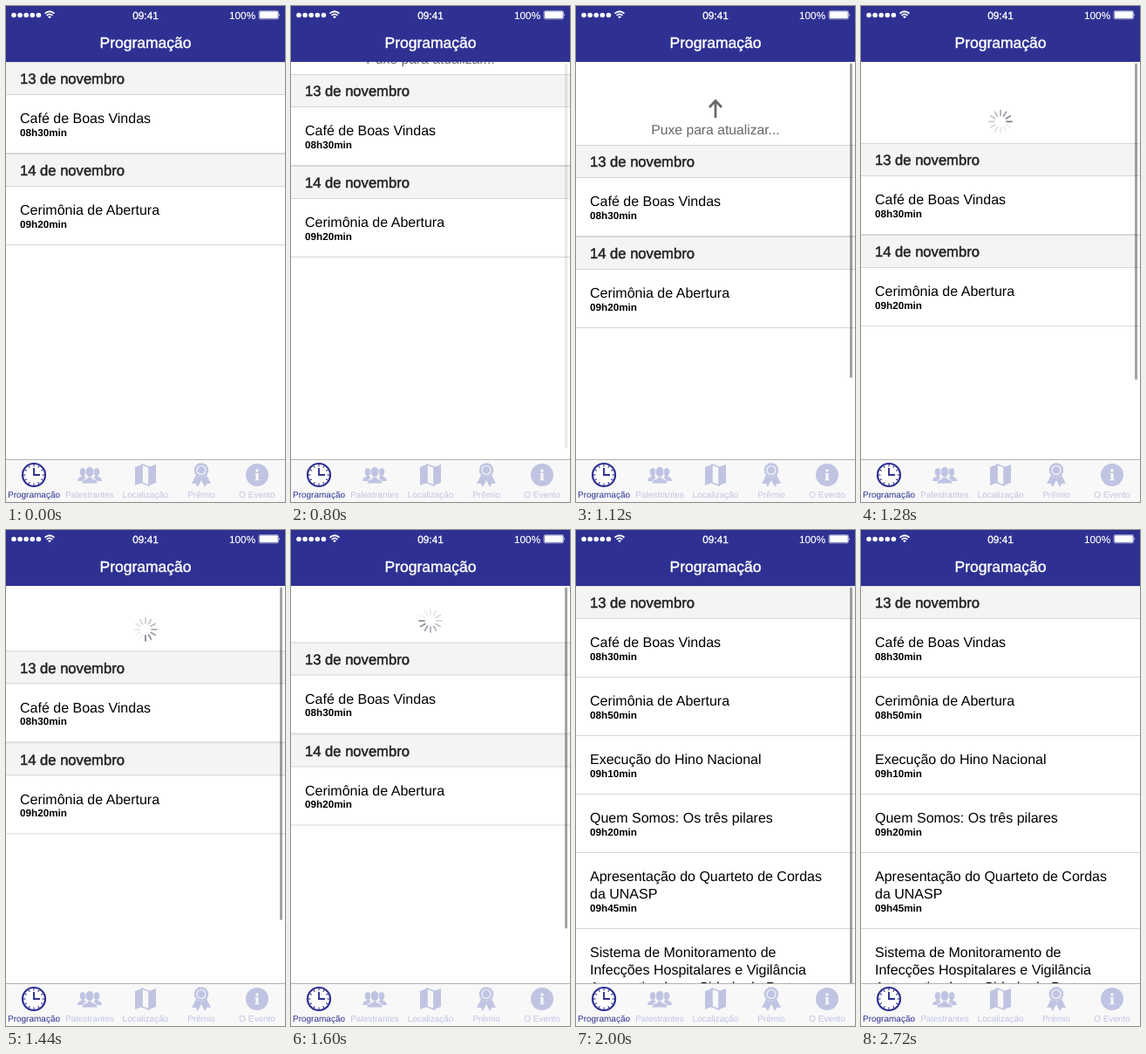
Write an HTML page that moves like this. It is 320x568 px and loops after 2880 ms.

```html
<!DOCTYPE html>
<html lang="pt-BR">
<head>
<meta charset="utf-8">
<title>Programação</title>
<style>
  html, body { margin: 0; width: 100%; height: 100%; overflow: hidden; background: #fff; }
  svg { display: block; width: 100vw; height: 100vh; }
  text { font-family: "Liberation Sans", Arial, sans-serif; text-rendering: geometricPrecision; }
  .day { font-size: 16.6px; fill: #222; stroke: #222; stroke-width: .5; }
  .event { font-size: 16px; fill: #000; }
  .time { font-size: 11.7px; font-weight: bold; fill: #000; }
  .status { font-size: 11.8px; fill: #fff; stroke: #fff; stroke-width: .15; }
  .tab { color: #c0c4e2; }
  .tab.active { color: #2e3192; }
  .tab text { font-size: 10px; fill: currentColor; text-anchor: middle; }
</style>
</head>
<body>
<svg viewBox="0 0 320 568">
  <rect width="320" height="568" fill="#fff"/>

  <g id="content">
    <g id="pull" fill="none" stroke="#666">
      <path id="arrow" d="M0-10V9M-7 2L0 9.500L7 2" stroke-width="2.700"/>
      <text x="160" y="-12" text-anchor="middle" font-size="15.7" fill="#666" stroke="none">Puxe para atualizar...</text>
    </g>
    <g id="spinner" transform="translate(160 -24.500)" stroke="#5f6270" stroke-width="1.700" stroke-linecap="round"></g>
    <g id="shortList"></g>
    <g id="fullList"></g>
  </g>
  <rect id="scrollbar" x="314" y="65.500" width="3" rx="1.500" fill="#000"/>

  <rect width="320" height="64" fill="#2e3192"/>
  <text x="160" y="48" text-anchor="middle" font-size="17.5" fill="#fff" stroke="#fff" stroke-width=".4">Programação</text>
  <g fill="#fff">
    <path d="M9 10.500H38" stroke="#fff" stroke-width="5.600" stroke-linecap="round" stroke-dasharray="0 7.100"/>
    <path d="M44.500 8.700Q50 3.800 55.500 8.700M46.600 10.900Q50 8 53.400 10.900" fill="none" stroke="#fff" stroke-width="1.700"/>
    <path d="M48 12.300Q50 10.800 52 12.300L50 14.300Z"/>
    <rect x="290" y="5.500" width="22.500" height="9.500" rx="1.500" fill="none" stroke="#fff" stroke-width=".5"/>
    <rect x="290.800" y="6.300" width="21" height="8" rx="1"/>
    <path d="M313.300 8.500Q315 10.200 313.300 12Z"/>
  </g>
  <text class="status" x="160" y="14.500" text-anchor="middle" style="stroke-width:.35">09:41</text>
  <text class="status" x="256" y="14.500">100%</text>

  <rect y="519" width="320" height="49" fill="#f8f8f8"/>
  <rect y="519" width="320" height="1" fill="#b2b2b2"/>
  <g class="tab active" transform="translate(32 537)">
    <circle r="13" fill="#fff" stroke="currentColor" stroke-width="2.200"/>
    <g id="ticks" stroke="currentColor" stroke-width="1.100"></g>
    <path d="M0-8V0H7" fill="none" stroke="currentColor" stroke-width="1.900"/>
    <text y="26">Programação</text>
  </g>
  <g class="tab" transform="translate(96 537)" fill="currentColor">
    <g id="sidePerson">
      <ellipse cx="-8" cy="-3.500" rx="3.300" ry="4.300"/>
      <path d="M-14 7Q-14 3-9.500 2V0H-6V2L-4 3Q-7 4-7.500 7Z"/>
    </g>
    <use href="#sidePerson" transform="scale(-1 1)"/>
    <g stroke="#f8f8f8" stroke-width=".8">
      <path d="M-9 10Q-9 5.500-2.500 4V0H2.500V4Q9 5.500 9 10Z"/>
      <ellipse cy="-3.500" rx="4.800" ry="6"/>
    </g>
    <text y="26">Palestrantes</text>
  </g>
  <g class="tab" transform="translate(160 537)" fill="currentColor">
    <path d="M-12-9L-4-12V9L-12 12ZM4-9L12-12V9L4 12Z"/>
    <path d="M-4-12L4-9V12L-4 9Z" fill="#f8f8f8" stroke="currentColor" stroke-width="1.600"/>
    <text y="26">Localização</text>
  </g>
  <g class="tab" transform="translate(224 537)" fill="currentColor">
    <path d="M-6 0L-11 10L-6.500 9.700L-4 14L0 6L4 14L6.500 9.700L11 10L6 0Z"/>
    <circle cy="-5.500" r="8" stroke="#f8f8f8" stroke-width=".8"/>
    <circle cy="-5.500" r="7.500" stroke="currentColor" stroke-width="1.600" stroke-dasharray="2.900 1"/>
    <circle cy="-5.500" r="5" fill="none" stroke="#f8f8f8" stroke-width="1.200"/>
    <text y="26">Prêmio</text>
  </g>
  <g class="tab" transform="translate(288 537)" fill="currentColor">
    <circle r="13"/>
    <g fill="#f8f8f8">
      <circle cy="-5" r="1.700"/>
      <path d="M-2.500-2H1.500V5.200H2.700V6.300H-2.700V5.200H-1.500V-1H-2.500Z"/>
    </g>
    <text y="26">O Evento</text>
  </g>
</svg>

<script>
const LOOP = 2880, STEP = 80, RELEASE = 1254, LOADED = 1760, CLOSED = 2000;
const byId = id => document.getElementById(id);
const clamp = v => Math.max(0, Math.min(1, v));

const welcome = { lines: ["Café de Boas Vindas"], time: "08h30min" };
const shortDays = [
  { day: "13 de novembro", events: [welcome] },
  { day: "14 de novembro", events: [{ lines: ["Cerimônia de Abertura"], time: "09h20min" }] },
];
const fullDays = [{ day: "13 de novembro", events: [
  welcome,
  { lines: ["Cerimônia de Abertura"], time: "08h50min" },
  { lines: ["Execução do Hino Nacional"], time: "09h10min" },
  { lines: ["Quem Somos: Os três pilares"], time: "09h20min" },
  { lines: ["Apresentação do Quarteto de Cordas", "da UNASP"], time: "09h45min" },
  { lines: ["Sistema de Monitoramento de", "Infecções Hospitalares e Vigilância", "Automatizado na Cidade de Porto"], time: "10h00min" },
] }];

function listMarkup(days) {
  let y = 0, out = "";
  const line = at => `<rect y="${at}" width="320" height="1" fill="#d6d6d6"/>`;
  const label = (kind, at, text) => `<text class="${kind}" x="16" y="${at}">${text}</text>`;
  for (const { day, events } of days) {
    out += `<rect y="${y}" width="320" height="38" fill="#f4f4f4"/>` +
      line(y) + line(y + 37) + label("day", y + 25.3, day);
    y += 38;
    for (const { lines, time } of events) {
      lines.forEach((text, i) => out += label("event", y + 32.3 + i * 20, text));
      y += 47 + lines.length * 20;
      out += label("time", y - 20, time) + line(y - 1);
    }
  }
  return out;
}

const spokes = (count, inner, outer) => Array.from({ length: count }, (_, i) =>
  `<path d="M0 ${-inner}V${-outer}" transform="rotate(${i * 360 / count})"/>`).join("");

byId("shortList").innerHTML = listMarkup(shortDays);
byId("fullList").innerHTML = listMarkup(fullDays);
byId("ticks").innerHTML = spokes(12, 9.5, 12);
byId("spinner").innerHTML = spokes(12, 7, 13);

const dragPoints = [0, 14, 47, 79, 91, 95, 97, 97];

function pullDistance(t) {
  if (t < 800 || t >= CLOSED) return 0;
  if (t < RELEASE) return dragPoints[Math.floor((t - 720) / STEP)];
  if (t <= LOADED) return 60 + 37 * (1 - (t - RELEASE) / 685) ** 3;
  return 60 * (1 - (t - LOADED) / (CLOSED - LOADED)) ** 2;
}

function show(id, visible) {
  byId(id).style.display = visible ? "" : "none";
}

function draw(now) {
  const t = Math.floor(now % LOOP / STEP) * STEP;
  const offset = pullDistance(t);
  const released = t >= RELEASE, loaded = t > LOADED;

  byId("content").setAttribute("transform", `translate(0 ${64 + offset})`);
  show("shortList", !loaded);
  show("fullList", loaded);
  show("pull", !released);
  show("spinner", released && t < CLOSED);

  const turn = 180 * clamp((t - 905) / 150);
  byId("arrow").setAttribute("transform", `translate(160 -41) rotate(${turn})`);

  const head = 0.3 + (t - 1280) / 640;
  [...byId("spinner").children].forEach((spoke, i) => {
    const age = ((head - i / 12) % 1 + 1) % 1;
    spoke.setAttribute("opacity", 0.08 + 0.82 * (1 - age) ** 1.6);
  });

  const fadeIn = clamp((t - 760) / 160), fadeOut = clamp((2600 - t) / 400);
  byId("scrollbar").setAttribute("height", 455.5 - offset);
  byId("scrollbar").setAttribute("opacity", 0.36 * fadeIn * fadeOut);
}

const start = performance.now();
function tick() {
  draw(performance.now() - start);
  requestAnimationFrame(tick);
}
tick();
</script>
</body>
</html>
```
